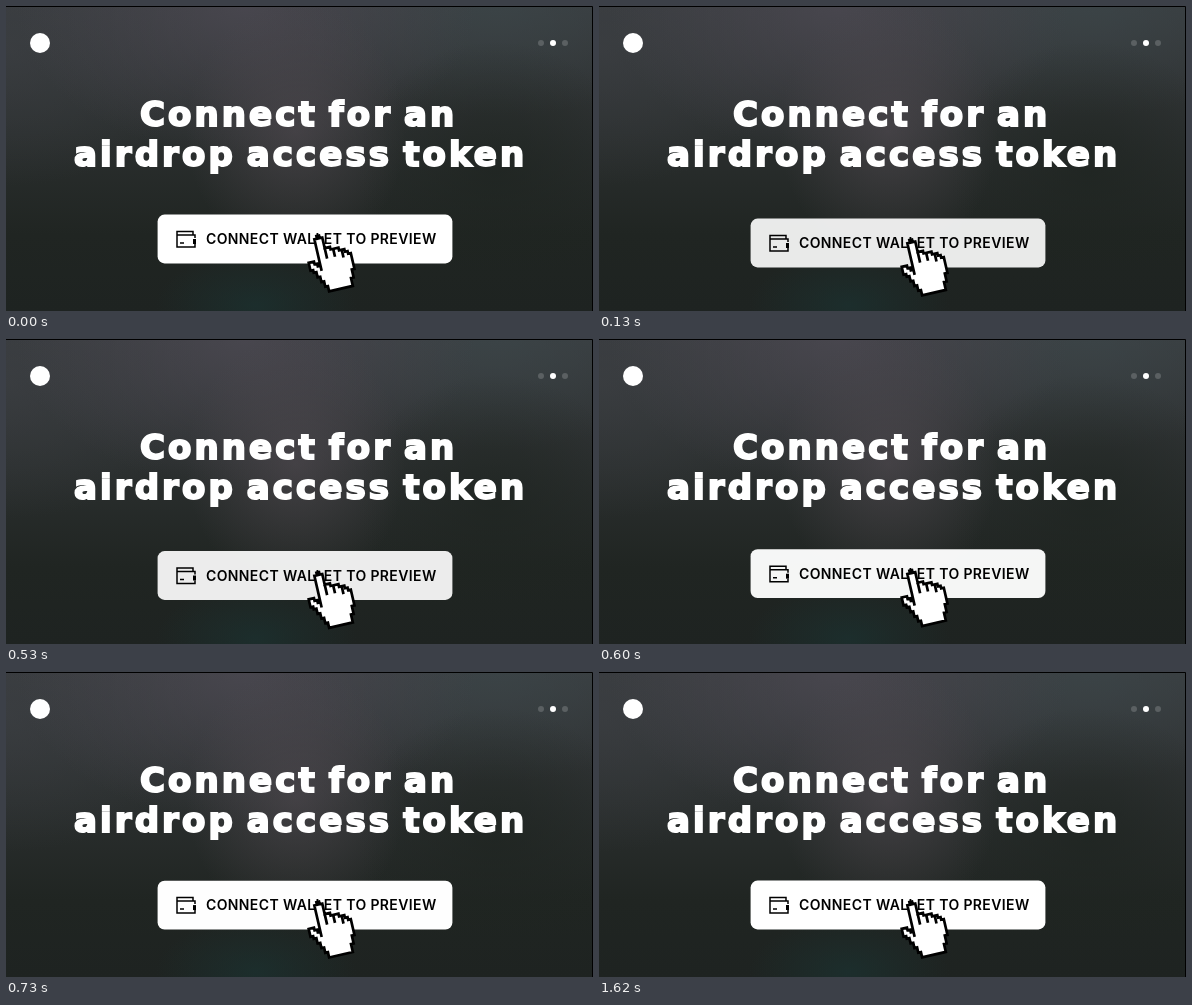
An HTML page for the animation above (2.16 s loop, 587x305 px).

```html
<!DOCTYPE html>
<html lang="en">
<head>
<meta charset="utf-8">
<title>Connect for an airdrop access token</title>
<style>
  html, body { margin: 0; width: 100%; height: 100%; overflow: hidden; background: #202423; }
  #stage {
    position: absolute; inset: 0; width: 587px; height: 305px;
    background:
      radial-gradient(100px 55px at 250px 300px, #1b3433a0, #1b343300),
      radial-gradient(110px 130px at 290px 125px, #504a50a0, #504a5000),
      radial-gradient(140px 130px at 490px 165px, #1e2420b0, #1e242000),
      radial-gradient(230px 150px at 240px 0, #4d4a53c0, #4d4a5300),
      radial-gradient(210px 110px at 490px 0, #3c4649c0, #3c464900),
      radial-gradient(200px 140px at 0 40px, #3d4044a0, #3d404400),
      linear-gradient(#383b3e, #2b2f2f 42%, #202522 75%, #1e2321);
  }
  svg { display: block; }
  .title {
    font: 700 34px "DejaVu Sans", sans-serif; letter-spacing: 3.1px; word-spacing: -4px;
    fill: #fff; stroke: #fff; stroke-width: 2px;
  }
  .label { font: 600 14px Inter, sans-serif; letter-spacing: .38px; }
  .line { fill: none; stroke: #000; }
</style>
</head>
<body>
<div id="stage">
<svg width="587" height="305" viewBox="0 0 587 305">
  <path d="M0 .5H586.5V305" class="line"/>
  <circle cx="34" cy="37" r="10" fill="#fff"/>
  <g fill="#5b6062">
    <circle cx="535" cy="37" r="3"/>
    <circle cx="547" cy="37" r="3" fill="#fff"/>
    <circle cx="559" cy="37" r="3"/>
  </g>
  <g class="title">
    <text x="134" y="120">Connect for an</text>
    <text x="68" y="160">airdrop access token</text>
  </g>
  <g id="press">
    <rect id="face" x="151.6" y="208.6" width="294.8" height="48.8" rx="7" fill="#fff"/>
    <g class="line" stroke-width="1.5">
      <path d="M187 229V225.5H171V241H189V238M171 229H189V232M174 237H178"/>
      <path d="M188.5 233V238" stroke-width="3"/>
    </g>
    <text class="label" x="200" y="238">CONNECT WALLET TO PREVIEW</text>
    <g transform="translate(311.4 228.5) rotate(-13) scale(2.7) translate(-5.5 .5)">
      <path class="line" style="fill:#fff" d="M4 13V1H5V0H6V1H7V5H9V6H12V7H14V8H15V9H16V15H15V18H14V21H5V19H4V17H3V15H2V13H1V12H0V9H2V10H3V11H4"/>
      <path class="line" d="M7 5V9M10 6V9M13 7V10"/>
    </g>
  </g>
</svg>
</div>
<script>
  const LOOP = 2160;
  // [start in ms, how far the button is pressed from 0 to 1]
  const steps = [[0, 0], [130, 1], [530, .88], [600, .42], [670, .06], [730, .02], [800, 0]];
  const press = document.getElementById("press");
  const face = document.getElementById("face");
  const start = performance.now();

  function draw() {
    const t = (performance.now() - start) % LOOP;
    const depth = steps.findLast(([at]) => t >= at)[1];
    press.setAttribute("transform", `translate(0 ${4 * depth})`);
    face.setAttribute("fill-opacity", 1 - .1 * depth);
    requestAnimationFrame(draw);
  }
  draw();
</script>
</body>
</html>
```
